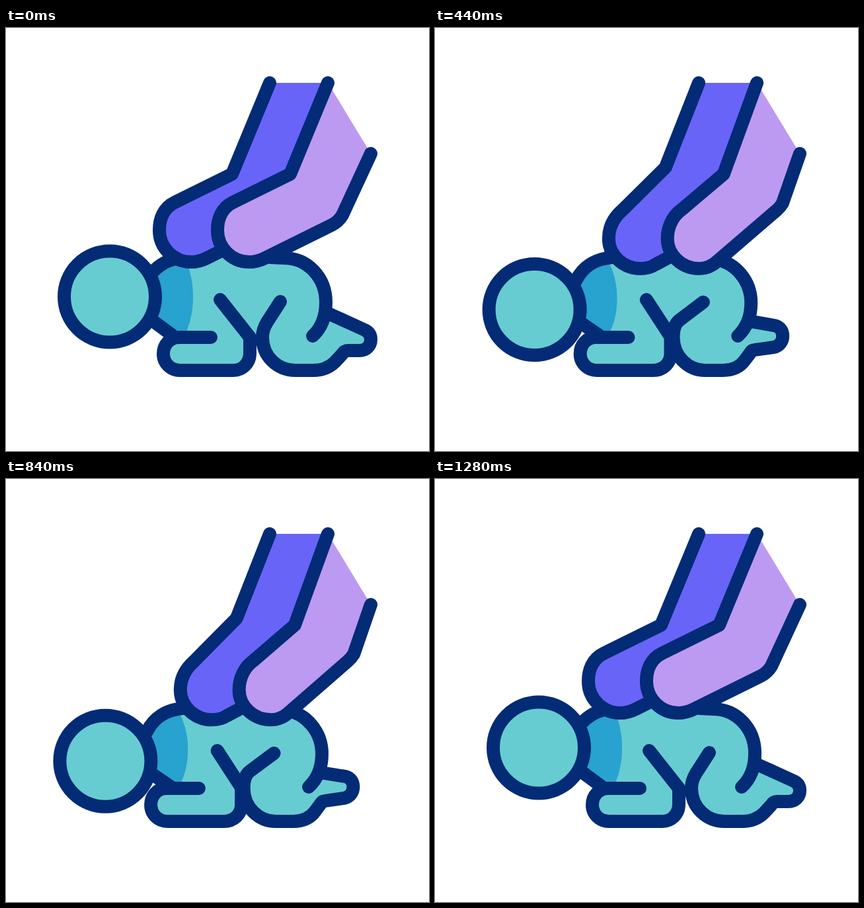
Animation, 640 px wide and 640 px high, one loop 1.4 s. Source, as an HTML page:

```html
<!DOCTYPE html>
<html lang="en">
<head>
<meta charset="utf-8">
<title>Back massage</title>
<style>
  html, body { margin: 0; width: 100%; height: 100%; overflow: hidden; background: #fff; }
  svg { display: block; width: 100%; height: 100%; }
  .line { fill: none; stroke: #032b76; stroke-width: 20; stroke-linecap: round; stroke-linejoin: round; }
  .skin { fill: #67ccd1; }
  .shade { fill: #28a2ce; }
  .far { fill: #6964f8; }
  .near { fill: #bc9af2; }
</style>
</head>
<body>
<svg id="stage" viewBox="0 0 640 640"></svg>
<script>
const LOOP = 1400, STEP = 40;

// Each shape: [relaxed pose, pressed pose]
const nape = ['M222 369C232 359 243 351 262 348', 'M212 384C222 362 242 349 268 347'];
const rump = ['L420 348C457 348 484 378 484 415C484 437 477 454 464 466',
              'L424 350C454 356 477 383 477 416C477 437 470 454 457 466'];
const back = join(['M400 347', 'M418 350'], rump);
const neck = ['M218 440L253 466', 'M218 445L252 468'];
const torso = join(nape, rump,
  ['L388 468L369 468L253 467L218 440Z', 'L355 468L354 468L252 468L218 445Z']);
const shade = join(nape,
  ['L271 349C280 369 283 388 283 408C283 428 279 446 271 464L253 467L218 440Z',
   'L258 349C270 370 274 390 274 408C274 428 271 446 261 464L252 468L218 445Z']);
const arm = [
  'M310 468L262 468C248 468 238 479 238 493C238 507 249 518 263 518L344 518C358 518 369 507 369 492L369 468L324 411',
  'M289 468L240 468C226 468 216 479 216 493C216 507 227 518 241 518L327 518C343 518 354 507 354 493L354 467L319 411'];
const leg = [
  'M415 414L395 445C390 453 388 461 388 468C388 497 411 518 438 518L465 518C479 518 489 514 498 505L509 493C511 490 514 488 518 488L535 488C545 488 552 481 552 471C552 465 549 460 543 457L488 432',
  'M404 415L364 442C357 447 355 456 355 468C355 497 378 518 403 518L430 518C446 518 457 511 463 502L470 492C472 488 474 487 476 487L508 482C516 480 521 473 521 465C521 457 517 451 509 449L474 446'];
const far = [
  'M399 83L342 221L256 263.5C238 272 232 289 232 306C232 333 254 354 280.5 354C290 354 296 352 303 348.5L326 337',
  'M399 83L350 209L289 278C277 290 269 304 269 321C269 346 291 366 317 366C327 366 333 364 339 360L363 347'];
const farFill = join(far, ['L430 221L487 83Z', 'L438 221L487 83Z']);
const near = [
  'M487 83L430 221L344 263.5C326 272 320 289 320 306C320 333 342 354 368 354C378 354 384 352 391 348.5L493 298C499 295 505 290 509 283L552 190',
  'M487 83L438 221L379 277C366 287 358 304 358 321C358 346 380 366 406 366C418 366 427 361 434 354L522 271C525 268 527 265 529 262L552 190'];
const head = ['M88 406.5a69 69 0 1 0 138 0a69 69 0 1 0 -138 0Z',
              'M80.3 430a69 69 0 1 0 138 0a69 69 0 1 0 -138 0Z'];

const layers = [
  ['skin', torso], ['skin', arm], ['skin', leg], ['shade', shade],
  ['line', nape], ['line', back], ['line', neck], ['line', arm], ['line', leg],
  ['skin', head], ['line', head],
  ['far', farFill], ['line', far],
  ['near', near], ['line', near]
];

function join(...parts) {
  return [0, 1].map(i => parts.map(p => p[i]).join(''));
}

function mix([a, b], p) {
  const ends = b.match(/-?[\d.]+/g);
  let i = 0;
  return a.replace(/-?[\d.]+/g, n => +n + (ends[i++] - n) * p);
}

// cubic-bezier(.6, 0, .4, 1)
function ease(x) {
  if (x <= 0) return 0;
  if (x >= 1) return 1;
  let lo = 0, hi = 1, t;
  for (let i = 0; i < 24; i++) {
    t = (lo + hi) / 2;
    const u = 1 - t;
    if (1.8 * t * u * u + 1.2 * t * t * u + t * t * t < x) lo = t; else hi = t;
  }
  return t * t * (3 - 2 * t);
}

function press(ms) {
  return ms < 640 ? ease((ms - 40) / 600) : 1 - ease((ms - 640) / 640);
}

const stage = document.getElementById('stage');
const paths = layers.map(([name]) => {
  const el = document.createElementNS(stage.namespaceURI, 'path');
  el.setAttribute('class', name);
  return stage.appendChild(el);
});

function draw(ms) {
  const p = press(Math.floor(ms % LOOP / STEP) * STEP);
  paths.forEach((el, i) => el.setAttribute('d', mix(layers[i][1], p)));
}

const start = performance.now();
function tick() {
  draw(performance.now() - start);
  requestAnimationFrame(tick);
}
tick();
</script>
</body>
</html>
```
